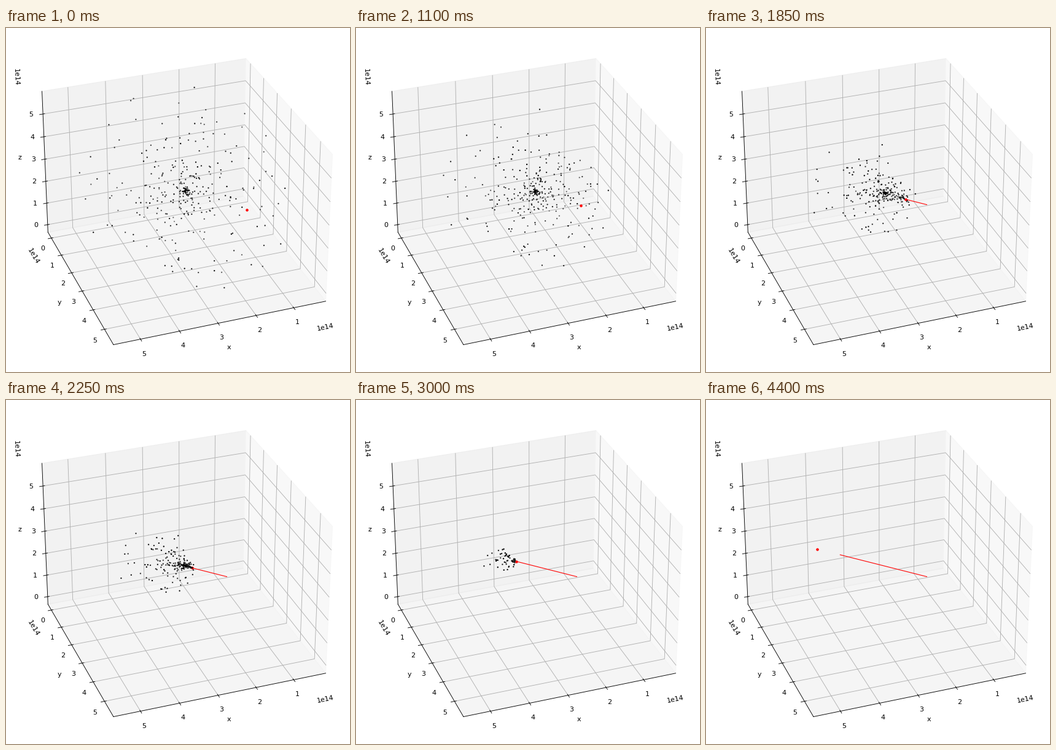
Animation of 560 by 560 pixels, one loop 5 s. Source, as a matplotlib script:

```python
import numpy as np
import matplotlib.pyplot as plt
from matplotlib.animation import FuncAnimation
from matplotlib.ticker import MultipleLocator

SIZE, DPI = 560, 80
INTERVAL, FRAMES = 50, 100
HOLD, STEPS = 12, 76
UNIT = 1e14

COUNT, RADIUS, CENTER = 310, 185, (291, 264)
FIRST_HIT, LAST_HIT = 11.8, 62.4


def star_at(s):
    """Screen position of the star after s steps."""
    run = 2.70 * s + 0.0012 * s ** 2
    return np.stack([391 - run, 295.2 - 0.2524 * run], axis=-1)


def make_cloud(rng):
    """Ball of particles, denser inside: start, meeting step, opacity."""
    way = rng.normal(size=(COUNT, 3))
    way /= np.linalg.norm(way, axis=1, keepdims=True)
    ball = RADIUS * rng.random((COUNT, 1)) ** 1.2 * way
    # Particles further along the star's path are met later
    along = ball @ [-0.127, 0.033, 0.2]
    span = (LAST_HIT - FIRST_HIT) / 2
    hit = FIRST_HIT + span * (1 + np.tanh(along / span))
    opacity = np.clip(0.7 + 0.4 * ball[:, 2] / RADIUS, 0.3, 1)
    return CENTER + ball[:, :2], hit, opacity


start, hit, opacity = make_cloud(np.random.default_rng(12))
target = star_at(hit)
shade = np.zeros((COUNT, 4))
shade[:, 3] = opacity

fig = plt.figure(figsize=(SIZE / DPI, SIZE / DPI), dpi=DPI)

box = fig.add_axes([0, 0, 1, 1], projection='3d', elev=30, azim=70)
box.set(xlim=(0.137 * UNIT, 5.684 * UNIT),
        ylim=(-0.349 * UNIT, 5.771 * UNIT),
        zlim=(-0.354 * UNIT, 5.986 * UNIT),
        xlabel='x', ylabel='y', zlabel='z')
for axis in (box.xaxis, box.yaxis, box.zaxis):
    axis.set_major_locator(MultipleLocator(UNIT))

# Screen-space layer in pixels, y down
layer = fig.add_axes([0, 0, 1, 1])
layer.set(xlim=(-0.5, SIZE - 0.5), ylim=(SIZE - 0.5, -0.5))
layer.axis('off')
trail, = layer.plot([], [], color='red', lw=1, zorder=1)
star = layer.scatter([], [], s=9, color='red', zorder=2)
dots = layer.scatter([], [], s=1.2, color='black', zorder=3)


def update(i):
    step = min(max(i - HOLD, 0), STEPS)
    s = max(step - 0.7, 0)

    star.set_offsets(star_at(s))
    ends = np.clip([0, s], FIRST_HIT, LAST_HIT)
    trail.set_data(*star_at(ends).T)
    trail.set_visible(s > FIRST_HIT)

    alive = hit > s
    part = (s / hit[alive])[:, None]
    dots.set_offsets(start[alive] + (target[alive] - start[alive]) * part)
    dots.set_color(shade[alive])
    return trail, star, dots


anim = FuncAnimation(fig, update, frames=FRAMES, interval=INTERVAL,
                     init_func=lambda: update(0), repeat=True, repeat_delay=0)
plt.show()
```
